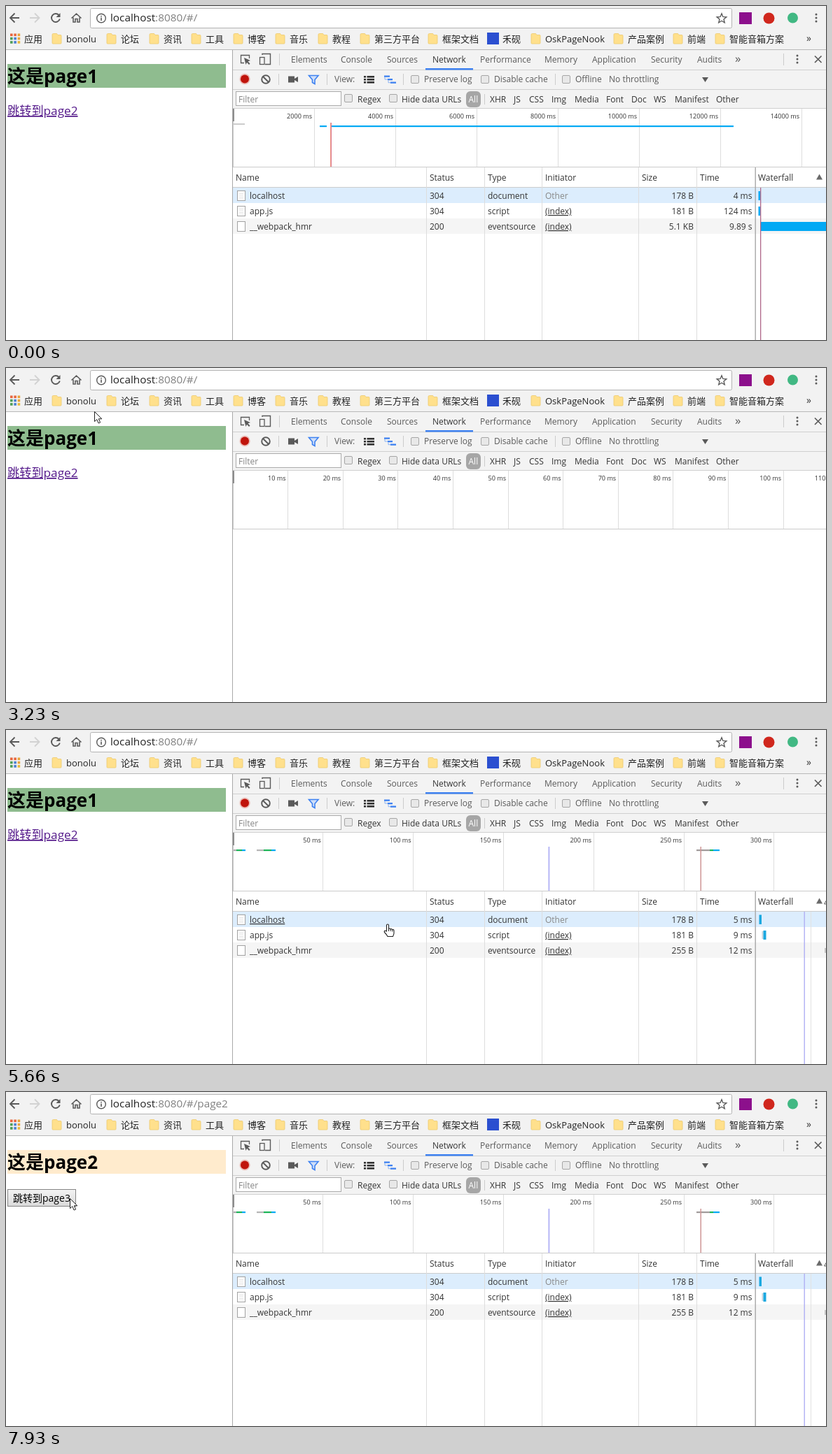
These frames come from a looping animation (1171x478 px, 8 s). An HTML page:

```html
<!DOCTYPE html>
<html lang="zh">
<head>
<meta charset="utf-8">
<title>Network panel</title>
<style>
html, body { margin: 0; width: 100%; height: 100%; overflow: hidden; background: #fff; }
svg { display: block; width: 100%; height: 100%; }
text { font: 12px 'Open Sans', 'Noto Sans CJK SC', 'Noto Sans CJK', sans-serif; white-space: pre; }
text.title { font-weight: 700; }
</style>
</head>
<body>
<svg id="stage" viewBox="0 0 1171 478"></svg>
<script>
const LOOP = 8000;
const BLUE = '#03a9f4', GREEN = '#19b455', INK = '#333', SOFT = '#5a5a5a';
const CLEAR = 2070, LOADED = 4330, PRESS = 7450, ROUTE = 7600;

// Markup helpers
const rect = (x, y, w, h, fill, more = '') =>
  `<rect x="${x}" y="${y}" width="${w}" height="${h}" fill="${fill}" ${more}/>`;
const text = (x, y, s, fill = INK, size = 12, more = '') =>
  `<text x="${x}" y="${y}" fill="${fill}" style="font-size:${size}px" ${more}>${s}</text>`;
const right = (x, y, s, size) => text(x, y, s, INK, size, 'text-anchor="end"');
const path = (d, stroke, w = 1.5, fill = 'none') =>
  `<path d="${d}" stroke="${stroke}" stroke-width="${w}" fill="${fill}"/>`;
const disc = (x, y, r, fill, more = '') => `<circle cx="${x}" cy="${y}" r="${r}" fill="${fill}" ${more}/>`;
const vline = (x, y1, y2, c = '#ddd', w = 1) => rect(x, y1, w, y2 - y1, c);
const group = (id, body) => `<g id="${id}">${body}</g>`;
const range = n => [...Array(n).keys()];
const dots = (x, y) => [-5, 0, 5].map(d => disc(x, y + d, 1.5, SOFT)).join('');
const labels = (y, fill, list) => list.map(([x, s]) => text(x, y, s, fill)).join('');
const box = (x, y) => rect(x + .5, y + .5, 11, 11, '#e8e8e8', 'stroke="#a6a6a6" rx="1.5"');

function browser() {
  const star = range(10).map(i => {
    const a = i * Math.PI / 5 - Math.PI / 2, r = i % 2 ? 3.2 : 7.2;
    return (1022 + r * Math.cos(a)).toFixed(1) + ' ' + (18 + r * Math.sin(a)).toFixed(1);
  }).join('L');
  const appColors = ['#e8663d', '#e8663d', '#e8a33d', '#4f9d57', '#4a7fd0', '#e8a33d', '#4f9d57', '#4a7fd0', '#e8b93d'];
  const marks = [[66, 'bonolu'], [144, '论坛'], [205, '资讯'], [265, '工具'], [325, '博客'], [385, '音乐'],
    [446, '教程'], [506, '第三方平台'], [603, '框架文档'], [750, 'OskPageNook'], [868, '产品案例'],
    [953, '前端'], [1013, '智能音箱方案']];
  return rect(0, 0, 1171, 62, '#f2f2f2') + rect(0, 62, 1171, 1, '#b9b9b9') +
    group('reloadHover', disc(71.5, 17, 16.8, '#d4d4d4')) +
    path('M19 17H6.5M12.5 10.5L6 17L12.5 23.5', SOFT, 1.8) +
    path('M34 17H47M41 10.5L47.5 17L41 23.5', '#d2d2d2', 1.8) +
    path('M75.5 13A6 6 0 1 0 76.8 18.5', SOFT, 1.9) + path('M77.5 10V16H71.5Z', 'none', 0, SOFT) +
    path('M93.5 17.5L100.5 11L107.5 17.5M96 16.5V23H99V18.5H102V23H105V16.5', SOFT, 1.6) +
    rect(120.5, 3.5, 916, 28, '#fff', 'stroke="#b3b3b3" rx="2"') +
    disc(136, 17.5, 6.3, 'none', `stroke="${SOFT}" stroke-width="1.4"`) +
    rect(135.2, 16.5, 1.6, 4.5, SOFT) + rect(135.2, 13.8, 1.6, 1.6, SOFT) +
    text(149, 22, 'localhost<tspan id="route" fill="#808080"></tspan>', '#222', 15.3) +
    path(`M${star}Z`, SOFT, 1.4) +
    rect(1047, 9, 18, 17, '#8c108c') + disc(1089.5, 17.5, 8, '#d0271d') + disc(1123.5, 17, 7.5, '#41b883') +
    dots(1157, 17) +
    appColors.map((c, i) => rect(6 + i % 3 * 5.3, 39.5 + (i / 3 | 0) * 5.3, 3.6, 3.6, c)).join('') +
    text(26, 52, '应用', '#222', 13) +
    marks.map(([x, s]) =>
      path(`M${x} 41q0-1.5 1.5-1.5h5l1.5 2h4q1 0 1 1v10.5q0 1-1 1h-11q-1 0-1-1z`, '#edca6c', .8, '#ffe08c') +
      text(x + 20, 52, s, '#222', 13)).join('') +
    rect(687, 38, 17, 17, '#2b4fd0') + text(709, 52, '禾砚', '#222', 13) + text(1143, 51, '»', '#333', 14);
}

const heading = (s, fill) => rect(2, 83, 312, 34, fill) + text(2, 110, s, '#000', 26, 'class="title"');

function page() {
  return group('page1', heading('这是page1', '#8fbc8f') +
    text(2, 156, '跳转到page2', '#551a8b', 17.2, 'id="link" text-decoration="underline"')) +
  group('page2', heading('这是page2', '#ffebcd') +
    rect(2.5, 139.5, 97, 24, 'url(#button)', 'stroke="#858585"') + text(10, 157, '跳转到page3', '#000', 14));
}

function tools() {
  const tabs = [[407, 'Elements'], [478, 'Console'], [544, 'Sources'], [677, 'Performance'], [769, 'Memory'],
    [837, 'Application'], [921, 'Security'], [987, 'Audits']];
  const kinds = [[691, 'XHR'], [725, 'JS'], [747, 'CSS'], [779, 'Img'], [812, 'Media'], [857, 'Font'],
    [893, 'Doc'], [925, 'WS'], [955, 'Manifest'], [1014, 'Other']];
  return rect(324, 63, 847, 84, '#f3f3f3') +
    [91, 119, 146].map(y => rect(324, y, 847, 1, '#cfcfcf')).join('') +
    path('M347.5 75V70.5H335.5V81.5H340', SOFT, 1.3) + path('M340 74L349 78L345.5 79.3L348.5 82.5L347 84L344 80.7L342.5 84Z', 'none', 0, SOFT) +
    path('M366 70V68.5H377.5V83.5H370', SOFT, 1.4) + rect(362.5, 73.5, 6.5, 10, '#f3f3f3', `stroke="${SOFT}" stroke-width="1.3"`) +
    vline(390, 68, 85, '#ccc') + labels(81, SOFT, tabs) + text(609, 81, 'Network', INK) +
    rect(599, 89, 68, 2.5, '#3f82f1') + text(1041, 81, '»', SOFT, 17) +
    vline(1110, 68, 85, '#ccc') + dots(1130, 76) + path('M1155 71.5L1164.5 81M1164.5 71.5L1155 81', SOFT, 1.7) +
    disc(341, 104.5, 7.7, '#ecbcb6') + disc(341, 104.5, 6, '#c0140c') +
    disc(371, 105, 5.8, 'none', `stroke="${SOFT}" stroke-width="1.9"`) + path('M367 101L375 109', SOFT, 1.9) +
    vline(389, 97, 113, '#ccc') + rect(403, 100.5, 9, 9, SOFT) + path('M412 104L417 101V109L412 106Z', 'none', 0, SOFT) +
    path('M432.5 99.5H446L441 105.5V111.5L437.5 109.5V105.5Z', '#3f82f1', 1.6, '#cfdff9') +
    vline(458, 97, 113, '#ccc') + text(469, 109, 'View:', SOFT) +
    [100, 104, 108].map(y => rect(511, y, 3, 2.6, INK) + rect(515.5, y, 10.5, 2.6, INK)).join('') +
    rect(540, 99.5, 8, 2.3, '#3f82f1') + rect(545, 104, 7, 2.3, '#3f82f1') + rect(549, 108.5, 8, 2.3, '#3f82f1') +
    path('M541 102V105H545M546 106.5V109.7H549', '#8ab3f3', 1) +
    vline(567, 97, 113, '#ccc') + box(578, 99) + box(678, 99) + vline(784, 97, 113, '#ccc') + box(794, 99) +
    labels(109, SOFT, [[597, 'Preserve log'], [697, 'Disable cache'], [813, 'Offline'], [861, 'No throttling']]) +
    path('M994 102H1003L998.5 109Z', 'none', 0, SOFT) +
    rect(328.5, 122.5, 150, 20, '#fff', 'stroke="#aaa"') + text(332, 138, 'Filter', '#858585') +
    box(483, 126) + text(502, 138, 'Regex') + box(547, 126) + text(565, 138, 'Hide data URLs') +
    rect(657, 122, 21, 23, '#a6a6a6', 'rx="6"') + text(660.5, 138, 'All', '#fff') +
    vline(683, 126, 141, '#ccc') + labels(138, INK, kinds);
}

const scale = (gap, unit, n) => range(n).map(i => {
  const x = 324 + gap * (i + 1);
  return vline(Math.floor(x), 147, 230) + right(x - 3, 161, unit * (i + 1) + ' ms', 9.1);
}).join('');
const bars = list => list.map(([x, end, c]) => rect(x, 171, end - x, 2.2, c)).join('');

function overviews() {
  return rect(324, 147, 847, 84, '#fff') +
    group('scaleOld', scale(116, 2000, 7) + rect(325, 168, 16, 2, '#ccc') +
      bars([[448, 458, BLUE], [465, 1039, BLUE]]) + vline(463, 167, 230, '#ee9a88') + vline(464, 167, 230, '#dd7f93')) +
    group('scaleEmpty', scale(78.6, 10, 11)) +
    group('scaleNew', scale(128.8, 50, 6) +
      bars([[324, 329, '#aaa'], [329, 337, GREEN], [337, 342, BLUE], [358, 368, '#b5b5b5'], [368, 379, GREEN],
        [379, 385, BLUE], [986, 1005, '#a09a9a'], [1005, 1010, GREEN], [1010, 1019, BLUE]]) +
      vline(774.5, 167, 230, '#b0b0f6', 1.8) + vline(991.5, 167, 230, '#cf9696', 1.5)) +
    rect(324, 147, 2, 18, '#8d8d8d') + vline(324, 165, 230, '#ccc') + rect(324, 230, 847, 1, '#ccc');
}

function rowText(i, name, status, type, from) {
  const y = 276 + i * 22;
  return rect(330.5, y - 11.5, 11, 14, '#fff', 'stroke="#a2a2a2"') +
    (i < 2 ? range(4).map(k => rect(333, y - 8 + k * 2.5, 6, .8, '#ddd')).join('') : '') +
    text(348, y, name, INK, 12, `id="name${i}"`) + text(605, y, status) + text(688, y, type) +
    text(770, y, from, i ? INK : '#888', 12, i ? 'text-decoration="underline"' : '');
}
const cells = list => list.map(([size, time], i) =>
  right(982, 276 + i * 22, size) + right(1065.5, 276 + i * 22, time)).join('');

function table() {
  const heads = [[328, 'Name'], [605, 'Status'], [688, 'Type'], [770, 'Initiator'], [908, 'Size'], [991, 'Time'], [1074, 'Waterfall']];
  return group('table',
    ['#dcedfd', '#fff', '#f5f5f5'].map((c, i) => rect(324, 260 + i * 22, 847, 22, c, `id="row${i}"`)).join('') +
    rect(324, 259, 847, 1, '#ccc') + labels(250, INK, heads) + path('M1157 248.5H1166L1161.5 240.5Z', 'none', 0, '#6a6a6a') +
    [600, 683, 765, 903, 986].map(x => vline(x, 231, 478)).join('') +
    rowText(0, 'localhost', 304, 'document', 'Other') + rowText(1, 'app.js', 304, 'script', '(index)') +
    rowText(2, '__webpack_hmr', 200, 'eventsource', '(index)') +
    group('dataOld', cells([['178 B', '4 ms'], ['181 B', '124 ms'], ['5.1 KB', '9.89 s']]) +
      rect(1074.5, 265, 3, 13, BLUE) + rect(1074.5, 287, 3.5, 13, BLUE) + rect(1077, 309, 94, 13, BLUE) +
      vline(1077, 260, 478, '#b0688a', 1.3)) +
    group('dataNew', cells([['178 B', '5 ms'], ['181 B', '9 ms'], ['255 B', '12 ms']]) +
      vline(1149, 260, 478, '#e2e2e2') + vline(1139.5, 260, 478, '#b0b0f4', 1.4) +
      rect(1075.5, 264.5, 3.5, 13.5, '#1ba8e0') + rect(1079.5, 288, 2, 11, '#c9d6dd') + rect(1081.5, 287, 4, 13, '#1ba8e0') +
      rect(1169, 312, 2, 7, '#c5c5c5') + path('M1172 243L1168.5 249H1172', SOFT, 1)) +
    vline(1069.5, 231, 478, '#a8a8a8', 1.4));
}

const pointer = group('arrow', path('M.5.5V14.6L3.8 11.6L6.1 17L8.6 16L6.3 10.8H10.8Z', '#222', 1, '#fff')) +
  group('hand', path('M-1.5 10V1.5Q-1.5 0 0 0T1.5 1.5V6.5Q3 5.3 4.2 7Q5.8 6 6.8 7.7Q9 7 9 9.5V13Q8.6 15.5 7.5 17.5H0Q-1.5 14.5-4.5 11.5Q-5.5 9.5-3.5 9.2Z', '#222', 1.1, '#fff') +
    path('M1.5 6.5V10M4.2 7V10M6.8 8V10.5', '#222', 1));

const stage = document.getElementById('stage');
stage.innerHTML = '<defs><linearGradient id="button" x2="0" y2="1"><stop stop-color="#f3f3f3"/><stop offset="1" stop-color="#dadada"/></linearGradient></defs>' +
  page() + browser() + tools() + overviews() + table() + vline(323, 63, 478, '#a9a9a9') +
  group('tip', rect(399, 313, 172, 28, '#000', 'opacity=".1" rx="2"') +
    rect(397.5, 311.5, 172, 27.5, '#fff', 'stroke="#bcbcbc" rx="2"') + text(406, 330, 'http://localhost:8080/app.js', '#5a5a5a')) +
  group('cursor', pointer);

const parts = {};
stage.querySelectorAll('[id]').forEach(e => parts[e.id] = e);
const show = (id, on) => parts[id].setAttribute('visibility', on ? 'inherit' : 'hidden');

// Pointer stops: time, x, y
const stops = [
  [350, 810, 458], [584, 620, 330], [800, 465, 195], [1130, 360, 99], [1230, 366, 99], [1380, 378, 99],
  [1610, 372, 103], [1790, 371, 104], [1940, 370, 104], [2620, 390, 108], [2776, 532, 131], [2854, 500, 124],
  [3166, 126, 62], [3244, 126, 62], [3400, 80, 40], [3480, 76, 36], [3700, 64, 15], [4280, 64, 15],
  [4590, 67, 39], [4710, 80, 52], [5020, 385, 290], [5100, 397, 298], [5256, 398, 299], [5490, 470, 325],
  [5580, 500, 305], [5736, 590, 250], [6048, 568, 354], [6204, 568, 354], [6360, 562, 335],
  [6430, 540, 325], [7130, 103, 153], [7210, 100, 152], [7300, 94, 152], [7930, 91, 152]
];
const bursts = [350, 1230, 1610, 1790, 2230, 2620, 3480, 3890, 4710, 5580, 6430, 7300, 7930];
const STEP = 78;

function pointerAt(t) {
  const from = bursts.filter(b => b <= t).pop() || 0;
  const q = from + Math.floor((t - from) / STEP) * STEP;
  const i = stops.findIndex(s => s[0] > q);
  if (i < 0) return stops[stops.length - 1].slice(1);
  if (!i) return stops[0].slice(1);
  const [t0, x0, y0] = stops[i - 1], [t1, x1, y1] = stops[i];
  const k = (q - t0) / (t1 - t0);
  return [x0 + (x1 - x0) * k, y0 + (y1 - y0) * k].map(Math.round);
}

function draw(t) {
  const [x, y] = pointerAt(t);
  const seen = t >= 350 && !(t >= CLEAR && t < 2230) && !(t >= PRESS && t < 7930);
  const old = t < CLEAR, fresh = t >= LOADED, second = t >= ROUTE;
  const row = seen && (old || fresh) && x > 324 && y >= 260 && y < 326 ? Math.floor((y - 260) / 22) : -1;
  const onName = row >= 0 && x > 345 && x < 600;
  const onLink = !second && x < 104 && y > 142 && y < 162;

  show('page1', !second);
  show('page2', second);
  show('scaleOld', old);
  show('scaleEmpty', !old && !fresh);
  show('scaleNew', fresh);
  show('table', old || fresh);
  show('dataOld', old);
  show('dataNew', fresh);
  show('reloadHover', t >= 3890 && Math.hypot(x - 71.5, y - 17) < 17);
  parts.route.textContent = second ? ':8080/#/page2' : ':8080/#/';
  parts.link.setAttribute('fill', t >= PRESS ? '#e00' : '#551a8b');

  ['#dcedfd', '#fff', '#f5f5f5'].forEach((c, i) => {
    parts['row' + i].setAttribute('fill', i && i === row ? '#ebf2fc' : c);
    parts['name' + i].setAttribute('text-decoration', onName && i === row ? 'underline' : 'none');
  });

  show('tip', t >= 5100 && t < 5340);
  parts.tip.setAttribute('opacity', t < 5180 ? .92 : 1);
  show('cursor', seen);
  show('arrow', !(onName || onLink));
  show('hand', onName || onLink);
  parts.cursor.setAttribute('transform', `translate(${x} ${y})`);
}

const start = performance.now();
function tick() {
  draw((performance.now() - start) % LOOP);
  requestAnimationFrame(tick);
}
tick();
</script>
</body>
</html>
```
